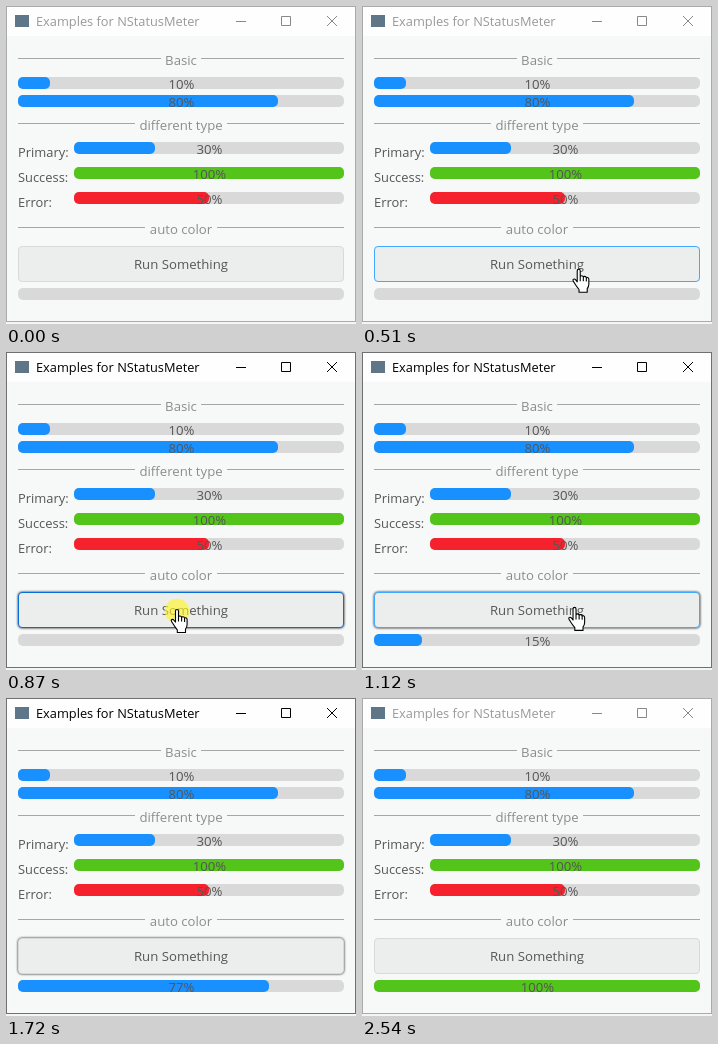
An HTML page for the animation above (2640 ms loop, 350 by 318 pixels).

```html
<!DOCTYPE html>
<html lang="en">
<head>
<meta charset="utf-8">
<title>Progress bar examples</title>
<style>
  html, body { margin: 0; width: 100%; height: 100%; overflow: hidden; background: #f4f5f5; }
  svg { display: block; width: 350px; height: 318px; }
  text { font: 13.2px "Open Sans", "Noto Sans", sans-serif; fill: #555; }
  .mid { text-anchor: middle; }
  .heading { fill: #8c8c8c; }
  .label { font-size: 12.9px; }
  #title { font-size: 12.8px; fill: #999; }
  #frame { fill: none; stroke: #aaa; }
  #controls { fill: none; stroke: #888; }
  .active #title { fill: #000; }
  .active #frame { stroke: #707070; }
  .active #controls { stroke: #000; }
  #button { fill: #eceeee; stroke: #d9d9d9; }
  .active #button { filter: drop-shadow(0 0 1px rgba(0, 0, 0, .55)) drop-shadow(0 0 1px rgba(0, 0, 0, .4)); }
  .hover #button { stroke: #40a9ff; }
  .pressed #button { stroke: #096dd9; }
  #glow { fill: #fff528; opacity: .65; visibility: hidden; }
  .pressed #glow { visibility: visible; }
  #cursor path { fill: #fff; stroke: #000; stroke-width: 1.1; stroke-linejoin: round; }
  #hand, .hover #arrow { visibility: hidden; }
  .hover #hand { visibility: visible; }
</style>
</head>
<body>
<svg id="stage" viewBox="0 0 350 318">
  <rect width="350" height="316" fill="#f7f9f9"/>
  <rect width="350" height="30" fill="#fefefe"/>
  <rect x="9" y="9" width="14" height="12" fill="#5f7688"/>
  <text id="title" x="30" y="20">Examples for NStatusMeter</text>
  <path id="controls" d="M230 15.5h10M275.5 10.5h9v9h-9zM321 10l10 10m0-10l-10 10"/>
  <g id="content"></g>
  <rect id="button" x="12.5" y="240.5" width="325" height="35" rx="3.5"/>
  <text class="mid" x="175" y="263">Run Something</text>
  <circle id="glow" cx="171" cy="259" r="12.3"/>
  <g id="cursor">
    <path id="hand" d="M-1.5 13V1.5a1.5 1.5 0 0 1 3 0V7.5q.2-1 1.4-1 1.5 0 1.7 1.5.3-.9 1.4-.8 1.4.1 1.6 1.6.3-.7 1.3-.5 1.2.3 1.2 1.8V15q0 2.4-1.6 4.5V23H.3V20.3Q-2 17.5-4.5 13.5-6.3 11-5.5 10.2-4.2 9.2-2.8 11L-1.5 12.6M1.5 7.5V12M4.6 8V12M7.6 8.8V12.4"/>
    <path id="arrow" d="M.5 .5V16.5L4.2 13 6.7 18.7 9 17.7 6.6 12.2H11.8Z"/>
  </g>
  <rect id="frame" x=".5" y=".5" width="349" height="315"/>
</svg>
<script>
const LOOP = 2640, ENTER = 80, PRESS = 820, RELEASE = 970, DONE = 1950, BLUR = 2540;
const BLUE = '#1890ff', GREEN = '#52c41a', RED = '#f5222d';
const $ = id => document.getElementById(id);

function add(tag, attrs, content = '') {
  const node = document.createElementNS('http://www.w3.org/2000/svg', tag);
  for (const key in attrs) node.setAttribute(key, attrs[key]);
  node.textContent = content;
  return $('content').appendChild(node);
}

function heading(y, label, halfGap) {
  add('path', {
    d: `M12 ${y + .5}H${175 - halfGap}M${175 + halfGap} ${y + .5}H338`, stroke: '#a6a6a6'
  });
  add('text', { class: 'mid heading', x: 175, y: y + 7 }, label);
}

// Draws an empty bar and returns its setter.
function bar(x, y) {
  const width = 338 - x;
  add('rect', { x, y, width, height: 12, rx: 5, fill: '#d9d9d9' });
  const fill = add('rect', { x, y, height: 12, rx: 5 });
  const label = add('text', { class: 'mid', x: x + width / 2 + .5, y: y + 11.8 });
  return (percent, color) => {
    fill.setAttribute('width', Math.max(0, Math.floor(width * percent / 100)));
    fill.setAttribute('fill', color);
    label.textContent = percent < 0 ? '' : percent + '%';
  };
}

function labelledBar(y, name, percent, color) {
  add('text', { class: 'label', x: 12, y: y + 15 }, name);
  bar(68, y)(percent, color);
}

heading(52, 'Basic', 20);
bar(12, 71)(10, BLUE);
bar(12, 89)(80, BLUE);
heading(117, 'different type', 46);
labelledBar(136, 'Primary:', 30, BLUE);
labelledBar(161, 'Success:', 100, GREEN);
labelledBar(186, 'Error:', 50, RED);
heading(221, 'auto color', 36);
const setTask = bar(12, 282);

const easeIn = u => u * u;
const easeOut = u => u * (2 - u);
const moves = [
  { start: ENTER, end: 270, from: [284, 291], to: [251.5, 267.5], ease: easeOut },
  { start: 410, end: PRESS, from: [251.5, 267.5], to: [171, 257.5], ease: easeOut },
  { start: RELEASE, end: 1293, from: [171, 257.5], to: [361, 248], ease: easeIn }
];

function pointerAt(t) {
  const move = moves.findLast(m => m.start <= t);
  if (!move) return [-99, 0];
  const { start, end, from, to, ease } = move;
  const k = ease(Math.min(1, (t - start) / (end - start)));
  return from.map((v, i) => v + (to[i] - v) * k);
}

function percentAt(t) {
  if (t < RELEASE) return -1;
  return Math.min(100, Math.floor((t - RELEASE) / (DONE - RELEASE) * 100.5));
}

function draw(t) {
  const [x, y] = pointerAt(t);
  const states = {
    active: t >= PRESS && t < BLUR,
    pressed: t >= PRESS && t < RELEASE,
    hover: x >= 12 && x < 338 && y >= 240 && y < 276
  };
  for (const name in states) $('stage').classList.toggle(name, states[name]);
  $('cursor').setAttribute('transform', `translate(${x} ${y})`);

  const percent = percentAt(t);
  setTask(percent, percent === 100 ? GREEN : BLUE);
}

const start = performance.now();
function loop() {
  draw((performance.now() - start) % LOOP);
  requestAnimationFrame(loop);
}
loop();
</script>
</body>
</html>
```
